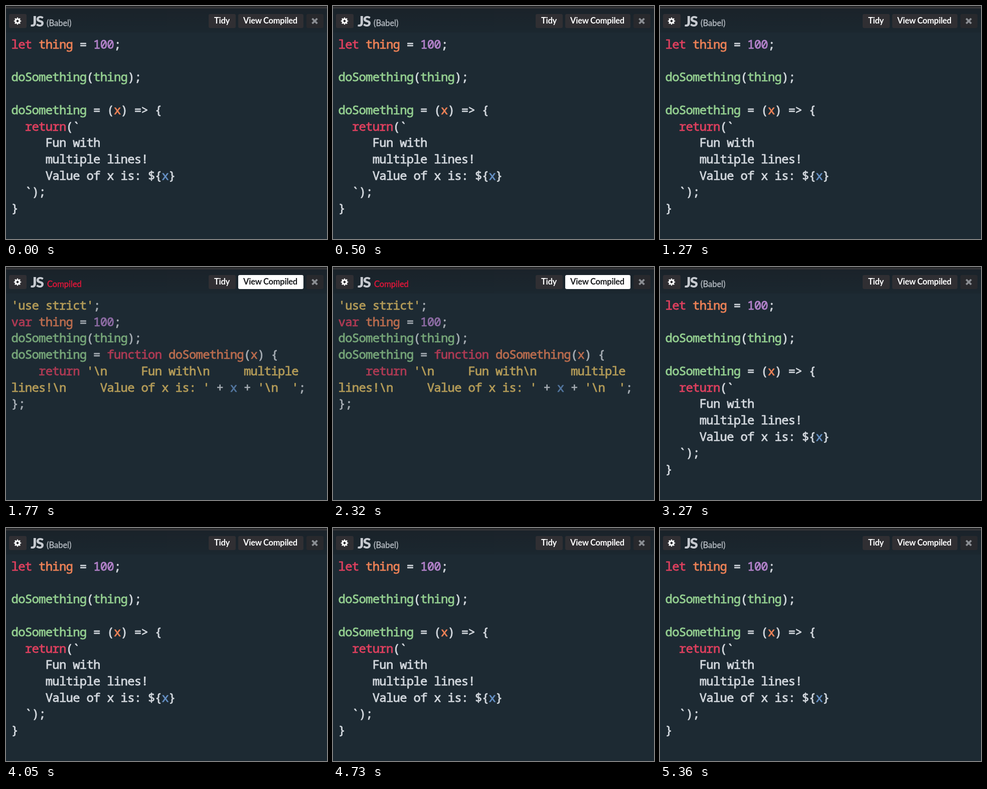
These frames come from a looping animation (640x465 px, 5400 ms). An HTML page:

```html
<!DOCTYPE html>
<html lang="en">
<head>
<meta charset="utf-8">
<title>Code editor</title>
<style>
  html, body { margin: 0; width: 100%; height: 100%; overflow: hidden; background: #1d2a33; }
  svg { display: block; width: 640px; height: 465px; }
  text { white-space: pre; font-family: Lato, sans-serif; }
  text, tspan { fill: currentColor; stroke: currentColor; stroke-width: 0; }
  .code text { font: 24px "Noto Sans Mono", monospace; letter-spacing: -0.77px; color: #d3d8de; }
  .code text, .code tspan { stroke-width: .8px; stroke-linejoin: round; }
  .compiled .code { opacity: .75; }
  .k { color: #e0405f; }
  .o { color: #ee8257; }
  .n { color: #b583cc; }
  .g { color: #94cf90; }
  .b { color: #6590c4; }
  .s { color: #e6c164; }
  .label { font-size: 16.5px; stroke-width: .4px; }
  .button { font-size: 16.5px; font-weight: 700; letter-spacing: -.25px; text-anchor: middle; color: #fff; }

  .edited, .compiled, .toggle, .toggle-text { animation: 5400ms step-end infinite; }
  .edited { animation-name: hide; }
  .compiled { animation-name: show; }
  .toggle { animation-name: toggle; }
  .toggle-text { animation-name: ink; }
  @keyframes hide {
    0%, 50% { visibility: visible; }
    30% { visibility: hidden; }
  }
  @keyframes show {
    0%, 50% { visibility: hidden; }
    30% { visibility: visible; }
  }
  @keyframes toggle {
    0%, 55.5% { fill: #302f33; }
    27%, 50% { fill: #555659; }
    30% { fill: #fff; }
  }
  @keyframes ink {
    0%, 50% { color: #fff; }
    30% { color: #17191c; }
  }
</style>
</head>
<body>
<svg viewBox="0 0 640 465">
  <defs>
    <linearGradient id="bar" x2="0" y2="1">
      <stop offset="0" stop-color="#1a2229"/>
      <stop offset="1" stop-color="#1b272f"/>
    </linearGradient>
  </defs>
  <rect width="640" height="465" fill="#1d2a33"/>
  <rect width="640" height="53" fill="url(#bar)"/>
  <rect width="640" height="5" fill="#343538"/>
  <rect width="640" height="2" fill="#1f2123"/>

  <g fill="#302f33">
    <rect x="6" y="16" width="35" height="28" rx="3"/>
    <rect x="404" y="16" width="54" height="28" rx="3"/>
    <rect class="toggle" x="463" y="16" width="130" height="28" rx="3"/>
    <rect x="599" y="16" width="34" height="28" rx="3" fill="#28292d"/>
  </g>
  <g fill="none" stroke="#fff">
    <circle cx="23" cy="30" r="4" stroke-width="3.2"/>
    <circle cx="23" cy="30" r="6" stroke-width="2.4" pathLength="16" stroke-dasharray="1" stroke-dashoffset=".5"/>
  </g>
  <path d="M610.5 25l10 10m0-10l-10 10" stroke="#8b8e93" stroke-width="3.8"/>
  <text x="49" y="41" font-size="29" font-weight="900" letter-spacing="-2" color="#c6cad0">JS</text>
  <text class="button" x="430.5" y="35">Tidy</text>
  <text class="button toggle-text" x="527" y="35">View Compiled</text>

  <g class="edited">
    <text class="label" x="81" y="40" color="#b4bac1">(Babel)</text>
    <g class="code" transform="translate(10.5 85)">
      <text><tspan class="k">let</tspan> <tspan class="o">thing</tspan> = <tspan class="n">100</tspan>;</text>
      <text y="65.4"><tspan class="g">doSomething</tspan>(<tspan class="g">thing</tspan>);</text>
      <text y="130.8"><tspan class="g">doSomething</tspan> = (<tspan class="o">x</tspan>) =&gt; {</text>
      <text y="163.5">  <tspan class="k">return</tspan>(`</text>
      <text y="196.2">     Fun with</text>
      <text y="228.9">     multiple lines!</text>
      <text y="261.6">     Value of x is: ${<tspan class="b">x</tspan>}</text>
      <text y="294.3">  `);</text>
      <text y="327">}</text>
    </g>
  </g>

  <g class="compiled">
    <text class="label" x="82" y="40" color="#e3163a">Compiled</text>
    <g class="code" transform="translate(10.5 85)">
      <text><tspan class="s">'use strict'</tspan>;</text>
      <text y="32.7"><tspan class="k">var</tspan> <tspan class="o">thing</tspan> = <tspan class="n">100</tspan>;</text>
      <text y="65.4"><tspan class="g">doSomething</tspan>(<tspan class="g">thing</tspan>);</text>
      <text y="98.1"><tspan class="g">doSomething</tspan> = <tspan class="k">function</tspan> <tspan class="o">doSomething</tspan>(<tspan class="o">x</tspan>) {</text>
      <text y="130.8">    <tspan class="k">return</tspan> <tspan class="s">'\n     Fun with\n     multiple</tspan></text>
      <text y="163.5"><tspan class="s">lines!\n     Value of x is: '</tspan> + <tspan class="b">x</tspan> + <tspan class="s">'\n  '</tspan>;</text>
      <text y="196.2">};</text>
    </g>
  </g>
</svg>
</body>
</html>
```
